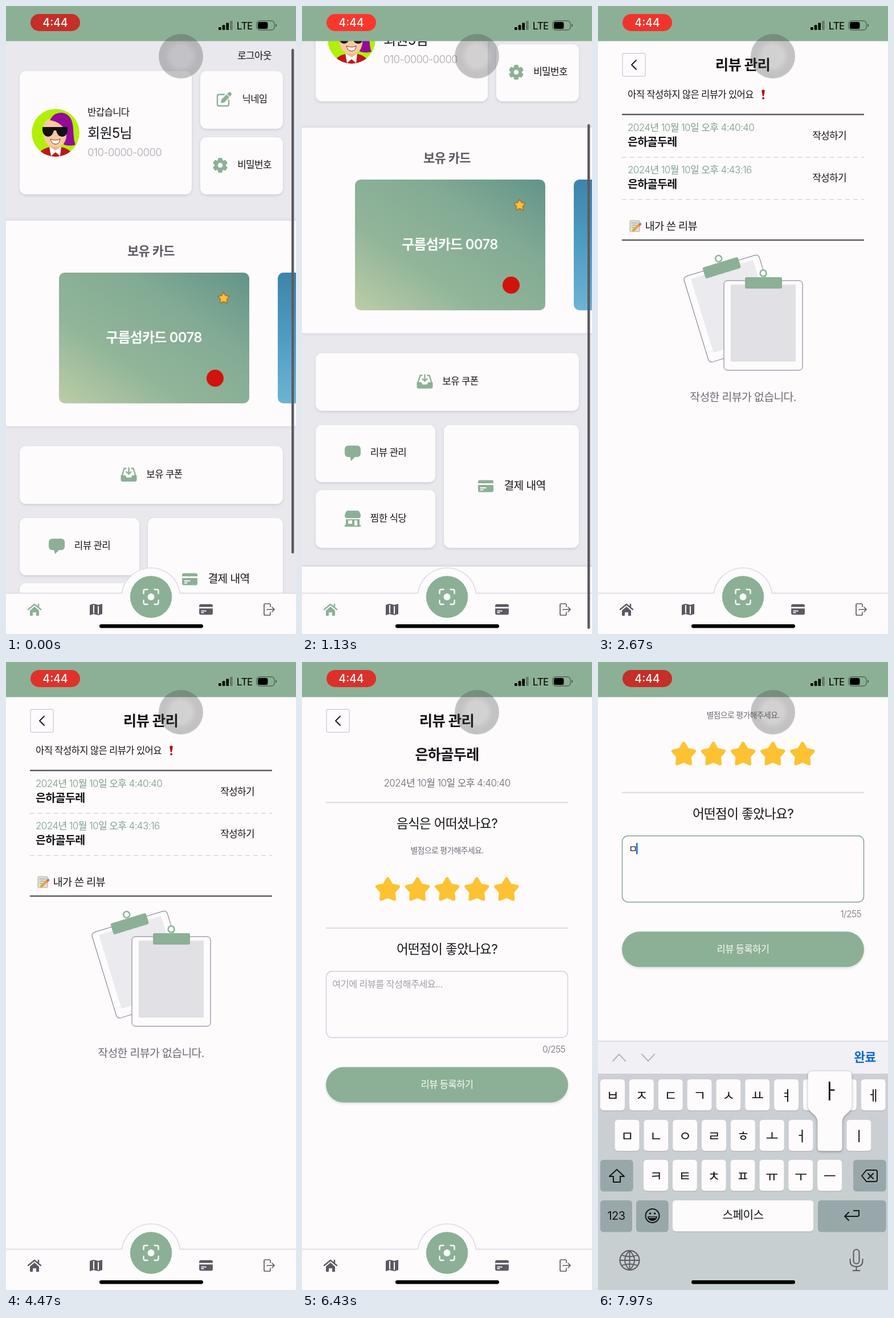
Recreate the animation shown at these times as an HTML page. Size 509x1100 px, loop 8000 ms.

```html
<!DOCTYPE html>
<html lang="ko">
<head>
<meta charset="utf-8">
<style>
  html, body { margin: 0; width: 100%; height: 100%; overflow: hidden; background: #fdfbfc; }
  svg { display: block; width: 100%; height: 100%; letter-spacing: -.04em;
    font-family: Inter, "Noto Sans CJK KR", "Noto Sans CJK", sans-serif; }
  .mid { text-anchor: middle; }
  .end { text-anchor: end; }
  .light { font-weight: 300; }
  .bold { font-weight: 700; }
  .semi { font-weight: 600; }
  .clock { font-weight: 500; letter-spacing: 0; }
  .carrier { font-family: "Noto Sans", sans-serif; font-weight: 500; }
  .lift { filter: drop-shadow(0 2px 2px #8886a044); }
  .key { filter: drop-shadow(0 1.5px 0 #868a9099); }
  .line { fill: none; stroke-linecap: round; stroke-linejoin: round; }
</style>
</head>
<body>
<svg id="stage" viewBox="0 0 509 1100"></svg>
<script>
const GREEN = '#8cb095', WHITE = '#fdfbfc', GREY = '#e9e8ed', DARK = '#5c5962', INK = '#151419', RULE = '#e0dee8';

const rect = (x, y, w, h, r, fill, more = '') =>
  `<rect x="${x}" y="${y}" width="${w}" height="${h}" rx="${r}" fill="${fill}" ${more}/>`;
const circle = (x, y, r, fill, more = '') => `<circle cx="${x}" cy="${y}" r="${r}" fill="${fill}" ${more}/>`;
const fillPath = (d, fill, more = '') => `<path d="${d}" fill="${fill}" ${more}/>`;
const stroke = (d, color, width, more = '') =>
  `<path class="line" d="${d}" stroke="${color}" stroke-width="${width}" ${more}/>`;
// y is the vertical centre of the glyphs
const text = (x, y, size, str, cls = '', fill = INK, more = '') =>
  `<text x="${x}" y="${y + size * .37}" font-size="${size}" class="${cls}" fill="${fill}" ${more}>${str}</text>`;
const group = (id, body, more = '') => `<g id="${id}" ${more}>${body}</g>`;
const at = (x, y, body, more = '') => `<g transform="translate(${x} ${y}) ${more}">${body}</g>`;
const card = (x, y, w, h) => rect(x, y, w, h, 11, WHITE, 'class="lift"');
const rule = (y, color, width, more = '') =>
  `<path d="M42 ${y}H467" stroke="${color}" stroke-width="${width}" ${more}/>`;

function star(x, y, r, fill, edge, width) {
  let points = '';
  for (let i = 0; i < 10; i++) {
    const a = Math.PI * (i / 5 - .5), d = i % 2 ? r * .55 : r;
    points += `${x + d * Math.cos(a)},${y + d * Math.sin(a)} `;
  }
  return `<polygon points="${points}" fill="${fill}" stroke="${edge}" stroke-width="${width}" stroke-linejoin="round"/>`;
}

// Icons are drawn around their own centre
const icon = {
  edit: stroke('M1-9H-8Q-11-9-11-6V8Q-11 11-8 11H6Q9 11 9 8V1', GREEN, 2.4)
    + fillPath('M-5 6L-4 0 5-9 10-4 1 5Z', GREEN) + fillPath('M6-10 9-13Q11-14 13-12 15-10 13-8L11-5Z', GREEN),
  gear: [0, 60, 120].map(a => rect(-4, -13, 8, 26, 2.5, GREEN, `transform="rotate(${a})"`)).join('')
    + circle(0, 0, 10, GREEN) + circle(0, 0, 4.3, WHITE),
  inbox: stroke('M-5-11H-8L-12 2M5-11H8L12 2', GREEN, 2.4)
    + fillPath('M-14 1H-6L-4 5H4L6 1H14V9Q14 12 11 12H-11Q-14 12-14 9Z', GREEN)
    + stroke('M0-12V-2M-4-5 0-1 4-5', GREEN, 2.4),
  chat: rect(-14, -13, 28, 20, 6, GREEN) + fillPath('M-5 5H6L-3 14Z', GREEN),
  store: fillPath('M-10-14H10Q14-10 14-5 14-1 10-1H-10Q-14-1-14-5-14-10-10-14Z', GREEN)
    + fillPath('M-12 1H12V11H14V14H-14V11H-12Z', GREEN)
    + rect(-8, 3, 7, 6, 0, WHITE) + rect(3, 3, 5, 9, 0, WHITE),
  pay: fill => rect(-13.5, -10.5, 27, 21, 3, fill) + rect(-13.5, -5, 27, 3, 0, WHITE)
    + stroke('M-9 3H0M-9 6.5H-5', WHITE, 2),
  home: fill => stroke('M-11 0 0-9 11 0M7-9V-5', fill, 2.4)
    + fillPath('M-8 2 0-5 8 2V11H3V5H-3V11H-8Z', fill),
  map: fillPath('M-11-8-4-10 4-8 11-10V8L4 10-4 8-11 10Z', DARK) + stroke('M-4-7V6M4-5V7', WHITE, 2),
  exit: stroke('M3-5V-8Q3-10 1-10H-6Q-8-10-8-8V8Q-8 10-6 10H1Q3 10 3 8V5M-3 0H10M6-4 10 0 6 4', DARK, 1.7),
};

const avatar = `<clipPath id="round"><circle cx="87" cy="222" r="42"/></clipPath><g clip-path="url(#round)">`
  + circle(87, 222, 42, '#b2ef08')
  + fillPath('M77 202Q82 186 99 187 117 190 118 216 119 238 122 243 113 246 102 243Z', '#930b97')
  + rect(79, 238, 16, 16, 3, '#eeb58d')
  + fillPath('M66 211Q67 196 86 197 106 198 106 215V228Q104 247 86 247 69 247 66 228Z', '#f8c99f')
  + fillPath('M77 200Q84 185 104 191 111 210 105 224 101 204 77 200Z', '#930b97')
  + fillPath('M64 212H108V219Q106 229 98 229 90 228 88 218H84Q82 228 74 229 66 228 64 219Z', '#111')
  + fillPath('M78 233Q87 237 95 233 94 242 87 242 80 242 78 233Z', '#fff', 'stroke="#743322"')
  + fillPath('M54 266Q59 250 77 247L87 257 97 247Q114 250 120 266Z', '#be171c')
  + fillPath('M76 246 87 253 97 246 95 263 87 256 79 263Z', '#fff') + '</g>';

const home = rect(0, 0, 509, 1145, 0, GREY)
  + rect(-9, 376, 527, 360, 0, WHITE, 'style="filter:drop-shadow(0 0 3px #8886a044)"')
  + rect(-9, 1145, 527, 300, 0, WHITE, 'style="filter:drop-shadow(0 -1px 2px #8886a044)"')
  + text(436, 87, 16.9, '로그아웃', 'mid')
  + card(24, 114, 302, 216) + card(341, 114, 145, 101) + card(341, 230, 145, 100)
  + card(24, 771, 462, 101) + card(24, 897, 210, 100) + card(24, 1011, 210, 101) + card(249, 897, 237, 215)
  + avatar
  + text(143, 186, 16.7, '반갑습니다') + text(143, 222, 24, '회원5님')
  + text(143, 256, 18.5, '010-0000-0000', 'light', '#aaa8b0')
  + at(382, 164, icon.edit) + text(436.5, 163, 16.6, '닉네임', 'mid')
  + at(376, 279, icon.gear) + text(436, 278, 16.9, '비밀번호', 'mid')
  + text(254.5, 429, 22, '보유 카드', 'mid bold', DARK)
  + rect(93, 467, 334, 229, 10, 'url(#leaf)') + rect(477, 467, 334, 229, 10, 'url(#sea)')
  + star(382, 512, 10.5, '#fdc22f', '#a8702d', 1.5)
  + text(259.5, 580, 23.8, '구름섬카드 0078', 'mid semi', '#fff')
  + circle(367, 652, 15, '#d2130b')
  + at(215.5, 821, icon.inbox) + text(278, 820, 16.8, '보유 쿠폰', 'mid')
  + at(89, 946, icon.chat) + text(151.5, 945, 16.8, '리뷰 관리', 'mid')
  + at(89, 1061, icon.store) + text(151.5, 1060, 16.8, '찜한 식당', 'mid')
  + at(322.5, 1004, icon.pay(GREEN)) + text(391, 1003, 19.2, '결제 내역', 'mid');

const title = rect(43, 83, 40, 40, 3, WHITE, 'stroke="#dcdae9" stroke-width="2"')
  + stroke('M67 95 59 103 67 111', INK, 1.9) + text(254, 103, 25.4, '리뷰 관리', 'mid semi');

const PLACE = '은하골두레', DAY = '2024년 10월 10일 오후 4:4';
const entry = (y, time) => text(52, y, 17.1, DAY + time, 'light', '#789d8b')
  + text(52, y + 25, 19.5, PLACE, 'semi') + text(406, y + 14, 16.9, '작성하기', 'mid')
  + rule(y + 52, RULE, 2, 'stroke-dasharray="8 6"');

const clipboard = paper => rect(0, 0, 138, 157, 6, WHITE, 'stroke="#77748c"') + rect(12, 7, 114, 135, 2, paper)
  + circle(69, -13, 5.5, WHITE, `stroke="${GREEN}" stroke-width="2.5"`) + rect(37, -6, 65, 20, 3, GREEN);

const memo = rect(56, 376, 17, 19, 1, '#e3e1dc', 'stroke="#aaa69f"')
  + stroke('M59 380H70M59 384H70M59 388H66', '#99958f', 1)
  + stroke('M62 393 74 382', '#eba72e', 4.5) + stroke('M73 383 74 382', '#d8706c', 4.5);

const review = rect(0, 0, 509, 1100, 0, WHITE) + title
  + text(52, 155, 16.6, '아직 작성하지 않은 리뷰가 있어요')
  + fillPath('M287 148Q290 145 293 148L291 158H289Z', '#b5141d') + circle(290, 161.5, 2, '#b5141d')
  + rule(190, DARK, 2.4) + entry(213, '0:40') + entry(287, '3:16')
  + memo + text(82.5, 385, 18.6, '내가 쓴 리뷰') + rule(410, '#5d615f', 2.4)
  + at(149.5, 475, clipboard('#ebebef'), 'rotate(-17)') + at(221, 481, clipboard('#e1e0e5'))
  + text(254.5, 685, 19.4, '작성한 리뷰가 없습니다.', 'mid', '#6d6a74');

const write = rect(0, 0, 509, 1400, 0, WHITE) + title
  + text(254.5, 162, 25.1, PLACE, 'mid bold')
  + text(254.5, 212, 17.1, DAY + '0:40', 'mid light', '#6d6a74')
  + rule(246, RULE, 2.6) + text(254.5, 283, 22.5, '음식은 어떠셨나요?', 'mid')
  + text(254.5, 330, 13.9, '별점으로 평가해주세요.', 'mid', '#6d6a74')
  + [0, 1, 2, 3, 4].map(i => star(150.5 + 52.1 * i, 399.5, 19.5, '#fdc232', '#fdc232', 6)).join('')
  + rule(466, RULE, 2.6) + text(254.5, 503, 22.5, '어떤점이 좋았나요?', 'mid')
  + rect(42.5, 541.8, 424, 116, 10, WHITE, 'id="box" stroke-width="1.4"')
  + text(53, 564, 16.4, '여기에 리뷰를 작성해주세요...', '', '#a19fa8', 'id="hint"')
  + text(54, 564, 16.4, 'ㅁ', '', INK, 'id="typed"')
  + rect(0, 554, 2.6, 20, 1, '#1c6fd4', 'id="caret"')
  + text(462, 678, 15.8, '', 'end light', '#6d6a74', 'id="count"')
  + rect(42, 709.6, 425, 62, 31, GREEN, 'class="lift"')
  + text(254.5, 740, 16.6, '리뷰 등록하기', 'mid', WHITE);

const nav = rect(0, 1028, 509, 72, 0, WHITE)
  + fillPath('M-2 1028.5H203.5A51.5 51.5 0 0 1 305.5 1028.5H511V1102H-2Z', WHITE, `stroke="${RULE}" stroke-width="1.8"`)
  + circle(254.5, 1035, 36.7, GREEN) + circle(254.5, 1035, 6, WHITE)
  + at(254.5, 1035, [0, 90, 180, 270].map(a =>
      stroke('M-13-6V-10Q-13-13-10-13H-6', WHITE, 2.4, `transform="rotate(${a})"`)).join(''))
  + at(50, 1057, group('homeOn', icon.home(GREEN)) + group('homeOff', icon.home(DARK)))
  + at(158, 1057, icon.map) + at(351, 1057, icon.pay(DARK), 'scale(.88)') + at(461, 1057, icon.exit);

const PITCH = 50.85;
const key = (x, y, w, fill = WHITE) => rect(x, y, w, 54.5, 5.5, fill, 'class="key"');
const keyRow = (x, y, letters) => [...letters].map((c, i) =>
  key(x + PITCH * i, y, 43) + text(x + 21.5 + PITCH * i, y + 28, 24, c, 'mid')).join('');
const DIM = '#98a7aa';

const keyboard = rect(0, 664, 509, 500, 0, 'url(#tray)') + rect(0, 664, 509, 57, 0, '#f1f0f5')
  + rect(0, 663.5, 509, 1.4, 0, '#cbd4e6')
  + stroke('M26 699 37 687 48 699M77 687 88 699 99 687', '#b6b5bc', 2)
  + text(468.5, 692, 21.5, '완료', 'mid bold', '#0c68cf')
  + keyRow(4, 731, 'ㅂㅈㄷㄱㅅㅛㅕㅑㅐㅔ') + keyRow(29.5, 802, 'ㅁㄴㅇㄹㅎㅗㅓㅏㅣ') + keyRow(80, 872, 'ㅋㅌㅊㅍㅠㅜㅡ')
  + key(4, 872, 57.5, DIM) + key(448, 872, 57.5, DIM) + key(4, 943, 56, DIM) + key(67, 943, 56.5, DIM)
  + key(131, 943, 247) + key(386, 943, 119.5, DIM)
  + stroke('M33 889 46 901H39V911H27V901H20Z', INK, 2)
  + stroke('M463 900 471 890H487Q490 890 490 893V907Q490 910 487 910H471ZM474 896 483 905M483 896 474 905', INK, 2)
  + text(32, 970, 20, '123', 'mid')
  + circle(95.5, 970, 12, 'none', `stroke="${INK}" stroke-width="2"`)
  + circle(91.5, 966, 1.8, INK) + circle(99.5, 966, 1.8, INK)
  + fillPath('M87 971H104Q103 979 95.5 979 88 979 87 971Z', INK) + stroke('M90 973H101', DIM, 1.5)
  + text(254.5, 968, 20.3, '스페이스', 'mid')
  + stroke('M440 964 433 971 440 978M433 971H455Q458 971 458 968V961H449', INK, 2)
  + at(55.5, 1048, circle(0, 0, 17, 'none', `stroke="${DARK}" stroke-width="2"`)
      + stroke('M0-17V17M-17 0H17M-14-9Q0-4 14-9M-14 9Q0 4 14 9M0-17Q-17 0 0 17Q17 0 0-17', DARK, 1.8))
  + at(453.5, 1048, rect(-5, -19, 10, 25, 5, 'none', `stroke="${DARK}" stroke-width="2"`)
      + stroke('M-11-2V1Q-11 11 0 11 11 11 11 1V-2M0 11V18M-6 18H6', DARK, 2))
  + group('bubble', fillPath('M-30-85H30Q38.5-85 38.5-77V-26Q38.5-18 31-12 21.5-5 21.5 4V49Q21.5 54.5 16 54.5H-16Q-21.5 54.5-21.5 49V4Q-21.5-5-31-12-38.5-18-38.5-26V-77Q-38.5-85-30-85Z', WHITE)
      + text(0, -50, 36, '', 'mid light', INK, 'id="letter"'), 'style="filter:drop-shadow(0 1px 2px #0005)"');

const status = rect(0, 0, 509, 61.5, 0, GREEN) + rect(43, 14, 87, 30, 15, '#f00', 'id="pill"')
  + text(86.5, 29, 19.5, '4:44', 'mid clock', '#fff')
  + [0, 1, 2, 3].map(i => rect(373 + 6.7 * i, 37 - 3.7 * i, 4.6, 5 + 3.7 * i, 1, '#000', i > 2 ? 'opacity=".3"' : '')).join('')
  + text(418.5, 34.5, 18.5, 'LTE', 'mid carrier', '#000')
  + rect(440, 26, 31, 16, 5, 'none', 'stroke="#000" stroke-opacity=".45" stroke-width="1.3"')
  + rect(442, 28, 17.5, 12, 3, '#000') + rect(473, 31.5, 2, 5, 1, '#0007');

const gradient = (id, dir, ...colors) => `<linearGradient id="${id}" ${dir}>`
  + colors.map((c, i) => `<stop offset="${i / (colors.length - 1)}" stop-color="${c}"/>`).join('') + '</linearGradient>';

const stage = document.getElementById('stage');
stage.innerHTML = '<defs>' + gradient('leaf', 'x1="0" y1="1" x2="1" y2="0"', '#bccda6', '#91b599', '#83ab94', '#62948a')
  + gradient('sea', 'x1="0" y1="0" x2="0" y2="1"', '#3d84aa', '#4f9cc3', '#6db4d3')
  + gradient('tray', 'x1="0" y1="0" x2="0" y2="1"', '#cfcfd7', '#c8cfd1', '#c8cfd1')
  + '<radialGradient id="touch"><stop offset=".45" stop-color="#444" stop-opacity=".23"/>'
  + '<stop offset=".75" stop-color="#444" stop-opacity=".31"/></radialGradient></defs>'
  + group('home', home) + group('review', review) + group('write', write) + group('nav', nav)
  + rect(501, 0, 4.5, 884, 2.2, '#5d5b63', 'id="bar"')
  + group('keyboard', keyboard) + status + rect(164, 1083, 182, 6.5, 3.2, '#000')
  + circle(307, 88, 39, 'url(#touch)');

const el = {};
stage.querySelectorAll('[id]').forEach(e => el[e.id] = e);
const show = (e, on) => e.style.display = on ? '' : 'none';
const move = (e, x, y) => e.setAttribute('transform', `translate(${x} ${y})`);
const clamp = v => Math.max(0, Math.min(1, v));
const smooth = v => v * v * (3 - 2 * v);
const spring = s => s < 0 ? 0 : 1 - (1 + 20 * s) * Math.exp(-20 * s);

const REVIEW = 1900, WRITE = 5050, FOCUS = 6650, TYPE = 7600;

function draw(t) {
  const scroll = 163 * smooth(clamp((t - 30) / 800));
  const rise = spring((t - FOCUS) / 1000);
  const focused = t >= FOCUS, typed = t >= TYPE;

  show(el.home, t < REVIEW);
  show(el.homeOn, t < REVIEW);
  show(el.homeOff, t >= REVIEW);
  show(el.review, t >= REVIEW && t < WRITE);
  show(el.write, t >= WRITE);
  move(el.home, 0, -scroll);
  move(el.bar, 0, 75 + scroll * 132 / 163);
  el.bar.setAttribute('opacity', 1 - clamp((t - 1400) / 250));

  move(el.write, 0, -237.3 * rise);
  show(el.keyboard, focused);
  move(el.keyboard, 0, 437 * (1 - rise));
  el.box.setAttribute('stroke', focused ? '#7f9f90' : '#cfcde0');
  show(el.hint, !typed);
  show(el.typed, typed);
  show(el.caret, focused);
  move(el.caret, typed ? 67 : 53.6, 0);
  el.count.textContent = (typed ? 1 : 0) + '/255';

  const press = t >= 7940 ? 7 : t >= 7560 && t < 7680 ? 0 : -1;
  show(el.bubble, press >= 0);
  if (press >= 0) {
    move(el.bubble, 51 + PITCH * press, 802);
    el.letter.textContent = press ? 'ㅏ' : 'ㅁ';
  }

  const glow = (1 - Math.cos(t * Math.PI / 1000)) / 2;
  el.pill.setAttribute('fill', `rgb(${198 + 57 * glow}, ${46 + 8 * glow}, ${40 + 4 * glow})`);
}

function tick() {
  draw(performance.now() % 8000);
  requestAnimationFrame(tick);
}
tick();
</script>
</body>
</html>
```
